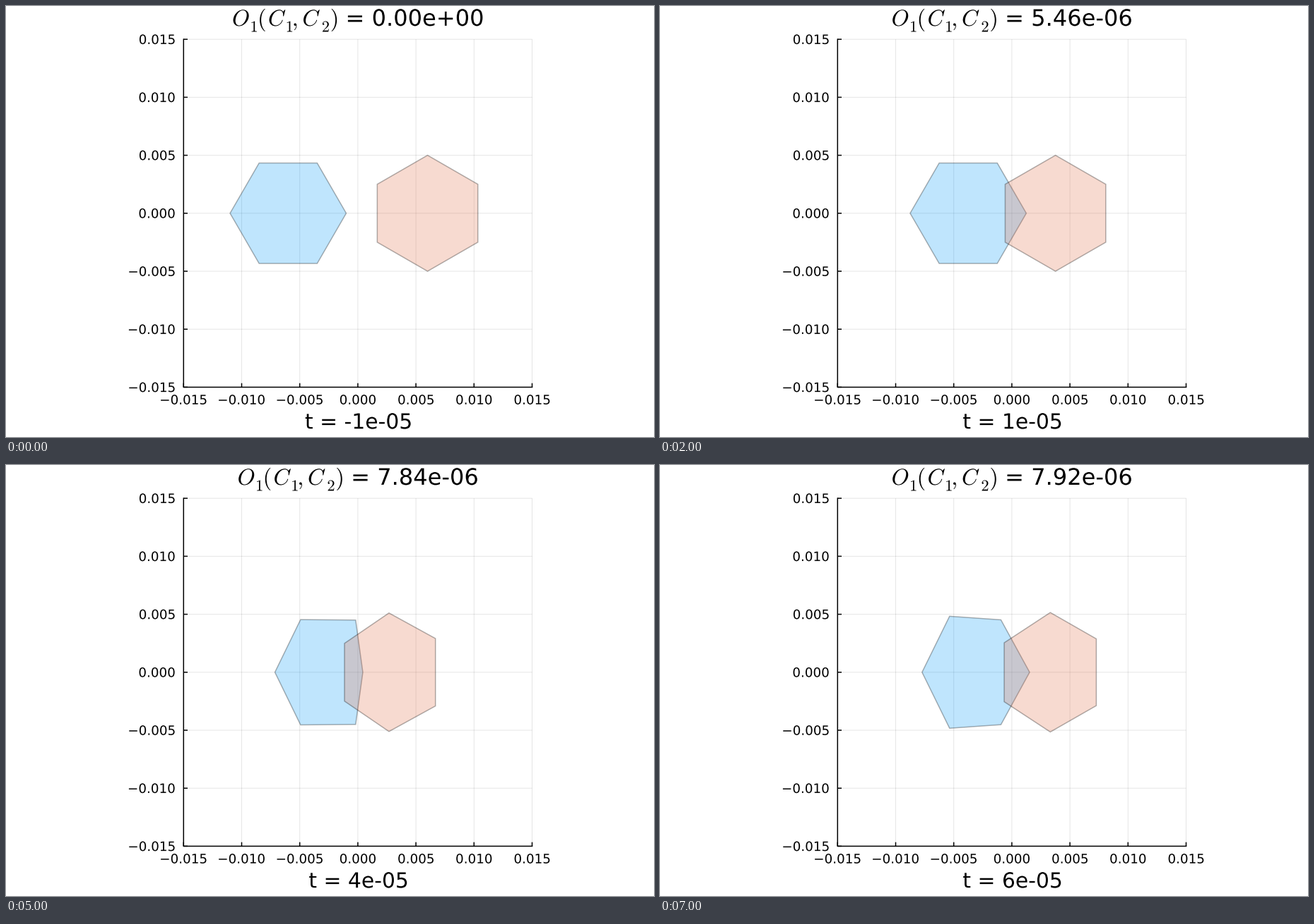
These frames come from a looping animation (917 px wide and 611 px high, 8000 ms). A matplotlib script:

```python
import matplotlib.pyplot as plt
import numpy as np
from matplotlib.animation import FuncAnimation
from matplotlib.patches import PathPatch, Polygon
from matplotlib.textpath import TextPath
from matplotlib.transforms import Affine2D

plt.rcParams["mathtext.fontset"] = "cm"

W, H, DPI = 917, 611, 64
PX = 72 / DPI                      # one pixel in points
CX, CY, SCALE = 497.9, 293.8, 16.44  # plot centre, pixels per 0.001
HALF = 15 * SCALE
TICK_SIZE, LABEL_SIZE, TITLE_SIZE = 18.34, 29.8, 32.1
BLUE, RED = (0, 0.605, 0.979), (0.889, 0.436, 0.278)

# Glyph, ink centre from the left end of the title, baseline, relative size
FORMULA = [
    ("O", 11.2, 28, 1), ("1", 29.8, 36.6, 0.7), ("(", 41.5, 28, 1),
    ("C", 62.5, 28, 1), ("1", 80, 36.6, 0.7), (",", 88, 28, 1),
    ("C", 111, 28, 1), ("2", 131, 36.6, 0.7), (")", 143, 28, 1),
]
FORMULA_WIDTH, GAP = 148, 14.5


def hexagon(cx, start):
    a = np.radians(start + 60 * np.arange(6))
    return np.column_stack([cx + 5 * np.cos(a), 5 * np.sin(a)])


def mirror(*upper):
    """Close an upper outline with its reflection in the x axis."""
    pts = np.array(upper)
    return np.vstack([pts, pts[::-1] * (1, -1)])


def apart(d):
    return hexagon(-d, 0), hexagon(d, 30)


REST = apart(6)
TOUCH = apart(3.755)
DEEP = (mirror((-6.51, 0), (-4.01, 4.33), (0.99, 4.33), (1.89, 0)),
        mirror((-1.24, 2.43), (1.51, 5), (5.84, 2.5)))
BOUNCE = (mirror((-6.62, 0), (-4.07, 4.62), (-0.91, 3.99), (0.77, 0)),
          mirror((0, 1.9), (2.07, 5.11), (6.12, 2.74)))
RELAX = (mirror((-7.14, 0), (-4.93, 4.54), (-0.19, 4.5), (0.43, 0)),
         mirror((-1.15, 2.49), (2.68, 5.11), (6.68, 2.91)))
SETTLE = (mirror((-7.73, 0), (-5.36, 4.83), (-0.94, 4.52), (1.53, 0)),
          mirror((-0.66, 2.54), (3.31, 5.15), (7.27, 2.88)))

# Pose and overlap area for each time step
STEPS = [(REST, 0), (REST, 0), (TOUCH, 5.46e-6), (DEEP, 1.93e-5),
         (BOUNCE, 1.35e-6), (RELAX, 7.84e-6), (SETTLE, 7.92e-6),
         (SETTLE, 7.92e-6)]

fig = plt.figure(figsize=(W / DPI, H / DPI), dpi=DPI, facecolor="white")
ax = fig.add_axes([0, 0, 1, 1])
ax.set_xlim(0, W)
ax.set_ylim(H, 0)
ax.axis("off")


def to_px(pts):
    return np.asarray(pts) * (SCALE, -SCALE) + (CX, CY)


def line(xs, ys, width, alpha=1.0, z=1, cap="butt"):
    ax.plot(xs, ys, color="black", lw=width * PX, alpha=alpha, zorder=z,
            solid_capstyle=cap, snap=False)


def ink_text(s, x, y, size, align=0.5):
    """Draw s with its ink box aligned at x; return the patch and its width."""
    path = TextPath((0, 0), s, size=size, prop={"family": "DejaVu Sans"})
    box = path.get_extents()
    left = x - align * box.width
    move = Affine2D().scale(1, -1).translate(left - box.x0, y)
    patch = PathPatch(move.transform_path(path), fc="black", lw=0, zorder=5)
    ax.add_patch(patch)
    return patch, box.width


def draw_axes():
    left, right, top, bottom = CX - HALF, CX + HALF, CY - HALF, CY + HALF
    for v in range(-15, 16, 5):
        x, y = to_px((v, v))
        line([x, x], [top, bottom], 1, 0.1)
        line([left, right], [y, y], 1, 0.1)
        line([x, x], [bottom, bottom - 5.7], 1.5, z=4)
        line([left, left + 5.7], [y, y], 1.5, z=4)
        label = f"{v / 1000:.3f}".replace("-", "\u2212")
        ink_text(label, x, 564.6, TICK_SIZE)
        ink_text(label, 238.6, y + 6.7, TICK_SIZE, 1)
    line([left, left, right], [top, bottom, bottom], 1.5, z=4,
         cap="projecting")


def add_body(rgb):
    patch = Polygon(REST[0], fc=(*rgb, 0.25), ec=(0, 0, 0, 0.3),
                    lw=1.5 * PX, zorder=3, snap=False)
    return ax.add_patch(patch)


def draw_title(value):
    text = f"= {value:.2e}"
    patch, width = ink_text(text, 0, 28, TITLE_SIZE)
    patch.remove()
    start = CX - (FORMULA_WIDTH + GAP + width) / 2
    parts = [ink_text(f"${g}$", start + x, y, TITLE_SIZE * k)[0]
             for g, x, y, k in FORMULA]
    tail = ink_text(text, start + FORMULA_WIDTH + GAP, 28, TITLE_SIZE, 0)[0]
    return parts + [tail]


draw_axes()
bodies = [add_body(BLUE), add_body(RED)]
texts = []


def update(i):
    for patch in texts:
        patch.remove()
    pose, area = STEPS[i]
    for body, pts in zip(bodies, pose):
        body.set_xy(to_px(pts))
    label = f"t = {i - 1}e-05" if i != 1 else "t = 0"
    texts[:] = draw_title(area)
    texts.append(ink_text(label, CX + 0.3, 599.2, LABEL_SIZE)[0])
    return bodies + texts


anim = FuncAnimation(fig, update, frames=len(STEPS), interval=1000,
                     repeat=True, repeat_delay=0, init_func=lambda: update(0))
plt.show()
```
